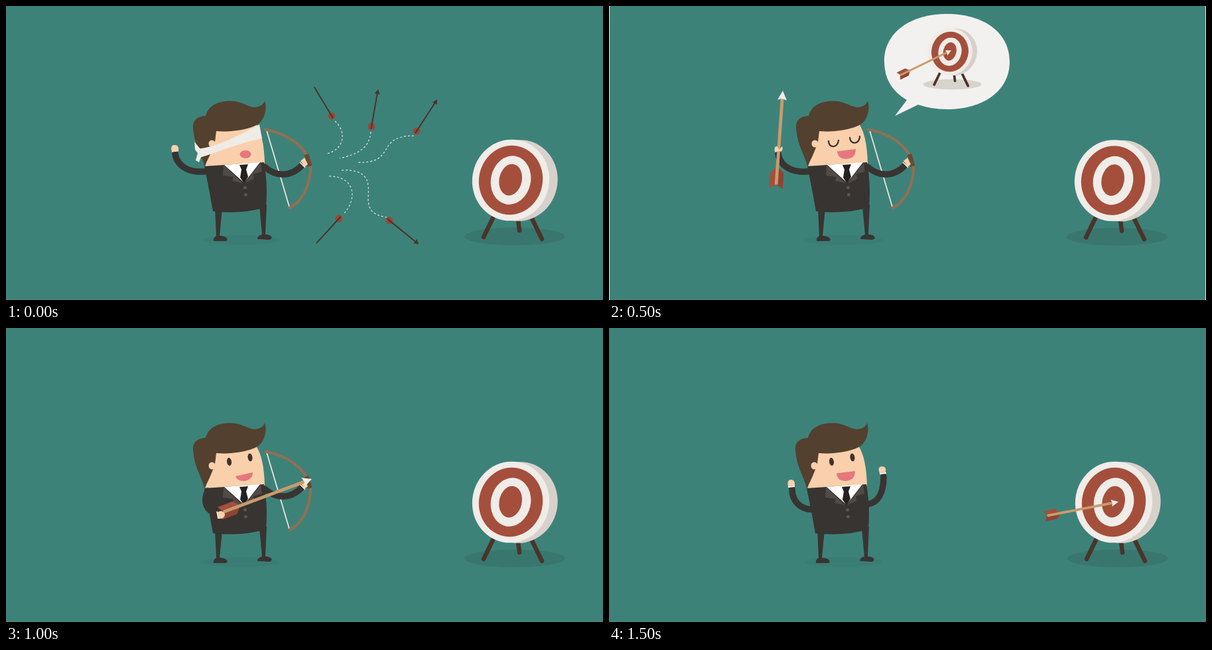
Recreate the animation shown at these times as an HTML page. Size 900x444 px, loop 2000 ms.

```html
<!DOCTYPE html>
<html lang="en">
<head>
<meta charset="utf-8">
<title>Archer</title>
<style>
  html, body { margin: 0; width: 100%; height: 100%; overflow: hidden; background: #3d8279; }
  svg { display: block; width: 900px; height: 444px; }
  .line { fill: none; stroke-linecap: round; }
  .suit { fill: #383431; }
  .arm { stroke: #383431; stroke-width: 9.5; }
  .skin { fill: #f9d0ab; }
  .hair { fill: #53402f; }
  .red { fill: #a44f3c; }
  .white { fill: #f0ece8; }
  .wood { stroke: #4a3429; }
  .mouth { fill: #e5777d; }
  .eye { fill: #40322a; }
</style>
</head>
<body>
<svg viewBox="0 0 900 444">
  <defs>
    <!-- centred on the bullseye -->
    <g id="target">
      <ellipse cx="6" cy="85" rx="76" ry="13.5" fill="currentColor"/>
      <path class="line wood" stroke-width="6.5" d="M-25 53L-41 86M11 60L13 76M29 52L47 89"/>
      <ellipse rx="58" ry="61.5" transform="translate(12.5 .5) rotate(12)" fill="#d8d1cb"/>
      <g transform="rotate(12)">
        <ellipse class="white" rx="58" ry="61.5"/>
        <ellipse class="red" rx="48" ry="52.5"/>
        <ellipse class="white" rx="30" ry="37"/>
        <ellipse class="red" cx="-.5" cy="-.5" rx="17" ry="24"/>
      </g>
    </g>
    <!-- tip at the origin, pointing right -->
    <g id="arrow">
      <path class="red" d="M-148 -10H-124L-115 0L-124 10H-148L-142 0Z"/>
      <path d="M-142 0H-115L-124 10H-148Z" fill="#8f4433"/>
      <path d="M-142 0H-11" stroke="#c99b6c" stroke-width="4.8"/>
      <path class="white" d="M0 0L-14 -7L-12 0L-14 7Z"/>
    </g>
    <g id="stray">
      <circle r="5.5" fill="#96483a"/>
      <path class="line wood" stroke-width="2" d="M-3 0H50"/>
    </g>
    <path id="head" d="M57 0L50 -4V4Z" fill="#4a3429"/>
  </defs>

  <rect width="900" height="444" fill="#3d8279"/>
  <rect y="443" width="900" height="1" fill="#50867e"/>
  <path data-on="1" d="M.5 0V444M899.5 0V444" stroke="#e4ecea"/>

  <g color="#39776e">
    <use data-on="023" href="#target" x="761" y="263"/>
    <use data-on="1" href="#target" x="760" y="263.5"/>
  </g>
  <use data-on="3" href="#arrow" transform="translate(768 262.5) rotate(-11) scale(.77)"/>

  <g data-on="1" color="#d8d3cc">
    <path fill="#f3f1ef" d="M415 84C415 40 454 12 509.5 12S604 40 604 84S565 156 509.5 156Q486 156 466 149L431 166L449 142Q415 122 415 84Z"/>
    <use href="#target" transform="translate(514 69) scale(.58)"/>
    <use href="#arrow" transform="translate(516 67) rotate(-26) scale(.6)"/>
  </g>

  <g data-on="0">
    <g fill="none" stroke="#d9e6e2" stroke-width="1.2" stroke-dasharray="3 3">
      <path d="M496 174C512 188 513 215 484 223"/>
      <path d="M550 190C548 215 530 224 503 230"/>
      <path d="M615 196C555 196 590 239 529 236"/>
      <path d="M487 257C525 257 532 290 508 315"/>
      <path d="M506 248C550 246 547 270 546 290C546 310 555 316 574 319"/>
    </g>
    <use href="#stray" transform="translate(491 166) rotate(-121)"/>
    <g transform="translate(551 182) rotate(-80)"><use href="#stray"/><use href="#head"/></g>
    <g transform="translate(619 189) rotate(-57)"><use href="#stray"/><use href="#head"/></g>
    <use href="#stray" transform="translate(502 321) rotate(132.5)"/>
    <g transform="translate(578 324) rotate(39)"><use href="#stray"/><use href="#head"/></g>
  </g>

  <g id="man">
    <ellipse cx="354" cy="353.5" rx="59" ry="7.5" fill="#3a7d74"/>
    <path class="suit" d="M315 305L317 347Q312 350 313 355H331Q335 354 333 351Q330 347 322 347L326 305ZM382 302L386 345Q379 347 379 352L397 353Q402 352 400 348Q397 345 391 345L393 300Z"/>
    <path class="skin" d="M315 186L377 178Q389 196 390 238L300 244Z"/>
    <path class="hair" d="M299 242C296 226 284 212 282 184C281 172 290 166 301 166C305 149 322 143 340 143.5C356 144 366 153 375 153C384 152 389 148 390 143C394 155 390 168 383 176C372 186 340 191 317 189L315 205Q309 224 299 242Z"/>
    <path class="suit" d="M299 242L389 236Q395 270 392 304Q355 315 312 310Q306 275 299 242Z"/>
    <path d="M329 240L383 236L359 267Z" fill="#fff"/>
    <path d="M328 240L357 268L341 264L343 258L327 256ZM384 236L360 268L374 261L373 254L386 250Z" fill="#504b47"/>
    <path d="M352 240L365 239L362 247L365 258L359 268L353 259L355 247Z" fill="#24211f"/>
    <g fill="#5a5551"><circle cx="360.5" cy="274.5" r="2.5"/><circle cx="361.5" cy="285" r="2.5"/></g>

    <g data-on="012">
      <path class="line" d="M393 188L427 303" stroke="#e8e4de" stroke-width="1.8"/>
      <path class="line arm" d="M390 243C406 257 428 260 447 240"/>
      <path d="M443 236L451 244" stroke="#fff" stroke-width="1.5"/>
      <path class="line" d="M391 186.5C430 194 459 218 459 248C457 275 445 296 428 304.5" stroke="#92704f" stroke-width="4.2"/>
      <path d="M453 224L458 242" stroke="#684a33" stroke-width="7"/>
      <path class="skin" d="M444 234L450 229L455 239L450 243Z"/>
    </g>

    <g data-on="01">
      <path class="line arm" d="M306 249C280 254 258 244 255 223"/>
      <path d="M250 220L260 218.5" stroke="#fff" stroke-width="1.5"/>
      <use data-on="1" href="#arrow" transform="translate(262 128) rotate(-86)"/>
      <path data-on="0" class="skin" d="M250 220Q247 210 254 210Q261 209 260 219Z"/>
      <path data-on="1" class="skin" d="M250 220Q248 211 254 212L256 217L261 212Q263 217 260 219Z"/>
    </g>

    <g data-on="2">
      <path class="line arm" d="M304 246C297 262 302 277 317 279"/>
      <use href="#arrow" transform="translate(461 228) rotate(-20.5)"/>
      <path d="M318 277L320 288" stroke="#fff" stroke-width="1.5"/>
      <path class="skin" d="M319 278Q327 274 330 281Q330 289 320 288Z"/>
    </g>

    <g data-on="3">
      <path class="line arm" d="M307 274C290 274 277 262 277 243M391 266C406 264 415 250 415 224"/>
      <path d="M271 240L281 239M409 220L419 219" stroke="#fff" stroke-width="2"/>
      <path class="skin" d="M271 239Q269 229 275 229Q282 229 281 238ZM409 219Q405 210 412 209Q420 209 418 218Z"/>
    </g>

    <ellipse class="skin" cx="310.5" cy="208" rx="5" ry="5.5"/>
    <g data-on="0" fill="#efebe6">
      <path d="M289 216C320 212 350 196 382 179L386 200C350 207 322 220 292 229Z"/>
      <path d="M293 216L284 205L285 217L289 222L286 233L291 236L294 228Z"/>
      <ellipse class="mouth" cx="361" cy="224" rx="8.5" ry="6"/>
    </g>
    <path data-on="1" class="line" d="M331 204C331 215 345 215 346 203M363 199C364 210 378 209 378 197" stroke="#40322a" stroke-width="2.3"/>
    <g data-on="23" class="eye">
      <ellipse rx="3.5" ry="6" transform="translate(336.5 202) rotate(-8)"/>
      <ellipse rx="3.5" ry="6" transform="translate(368 195.5) rotate(-8)"/>
    </g>
    <path data-on="13" class="mouth" d="M344 219.5L372 216Q372 230 358 231Q345 231 344 219.5Z"/>
    <path data-on="2" class="mouth" d="M346 224L372 218Q372 228 361 231Q349 232 346 224Z"/>
  </g>
</svg>
<script>
  const STEP = 500, POSES = 4;
  const parts = document.querySelectorAll('[data-on]');
  const man = document.getElementById('man');

  function draw(time) {
    const pose = Math.floor(time / STEP) % POSES;
    for (const part of parts) {
      part.style.display = part.dataset.on.includes(pose) ? '' : 'none';
    }
    man.setAttribute('transform', `translate(${pose === 3 ? -1 : 0} 0)`);
    requestAnimationFrame(draw);
  }
  draw(0);
</script>
</body>
</html>
```
